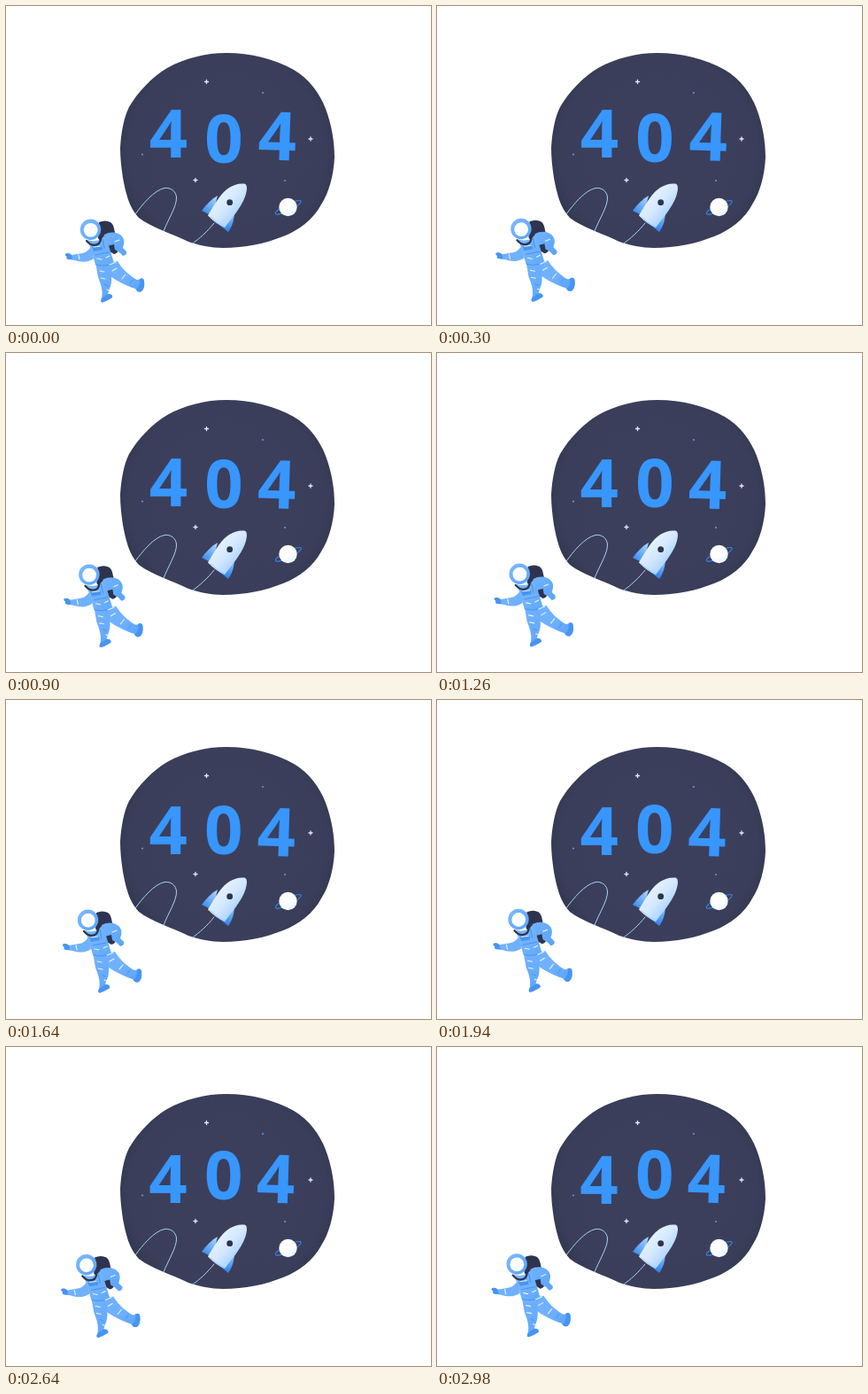
Write an HTML page with a canvas that moves like this. It is 480 px wide and 360 px high and loops after 3000 ms.

```html
<!DOCTYPE html>
<html lang="en">
<head>
<meta charset="utf-8">
<title>404</title>
<style>
html, body { margin: 0; width: 100%; height: 100%; overflow: hidden; background: #fff; }
canvas { display: block; }
</style>
</head>
<body>
<canvas id="stage" width="480" height="360"></canvas>
<script>
const ctx = document.getElementById('stage').getContext('2d');
const LOOP = 3000;
const NAVY = '#3a3e5a', INK = '#2f344e', BLUE = '#3896ff', SUIT = '#70b1ff', SHADE = '#4794f2', PALE = '#d3e8ff';

const space = new Path2D('M249 53C276 53 304 60 325 72C342 82 354 98 361 116C368 135 371 153 371 171C370 191 365 210 356 224C347 241 331 253 313 260C293 268 270 273 245 273C231 273 218 270 206 266C188 257 164 250 150 239C139 228 135 210 132 194C130 181 129 170 129 160C130 143 133 126 139 114C149 97 165 80 182 70C202 59 225 53 249 53Z');

const path = d => new Path2D(d);

function fill(d, color) {
  ctx.fillStyle = color;
  ctx.fill(path(d));
}

function line(d, color, width) {
  ctx.strokeStyle = color;
  ctx.lineWidth = width;
  ctx.lineCap = ctx.lineJoin = 'round';
  ctx.stroke(path(d));
}

function disc(x, y, r, color) {
  ctx.fillStyle = color;
  ctx.beginPath();
  ctx.arc(x, y, r, 0, Math.PI * 2);
  ctx.fill();
}

function linear(x0, y0, x1, y1, ...colors) {
  const g = ctx.createLinearGradient(x0, y0, x1, y1);
  colors.forEach((c, i) => g.addColorStop(i / (colors.length - 1), c));
  return g;
}

function drawSpace() {
  const g = ctx.createRadialGradient(250, 163, 70, 250, 163, 125);
  g.addColorStop(0, '#3b3f5c');
  g.addColorStop(0.75, NAVY);
  g.addColorStop(1, '#343953');
  ctx.fillStyle = g;
  ctx.fill(space);

  for (const [x, y] of [[226.5, 85.5], [344, 150], [214, 196.5]]) {
    line(`M${x - 2} ${y}h4M${x} ${y - 2}v4`, '#dcecff', 1.3);
  }
  for (const [x, y] of [[290, 98], [154, 167.5], [315, 197]]) disc(x, y, 0.9, '#68a9f2');

  line('M146 235C154 224 167 208 179 205.5C186 204.5 192 209 192.5 216C193 226 183 241 178 254', '#a9d2f5', 1);
  line('M210 268.5C218 263 228 254 235 245', '#a9d2f5', 1);
}

function drawPlanet() {
  ctx.strokeStyle = '#3686e6';
  ctx.lineWidth = 1.1;
  ctx.beginPath();
  ctx.ellipse(318.8, 227.3, 16, 3.6, -0.46, 0, Math.PI * 2);
  ctx.stroke();
  disc(318.5, 227, 10.2, linear(314, 219, 324, 237, '#fff', '#fff', '#e8f2ff'));
}

function drawRocket() {
  fill('M239 214C232 218 226 224 221 231L233 237Z', linear(237, 216, 224, 233, '#a5d0ff', '#3e8ff0'));
  fill('M258 231C258 240 256 248 251 255L241 247Z', linear(258, 234, 249, 254, '#8fc3ff', '#2f83ea'));
  fill('M268 200.5C271 200.5 272 202 272 206C271 218 264 229 247 250Q237 246 228 236.5C237 221 244 210 252 205C257 202 263 200 268 200.5Z',
    linear(239, 217, 260, 236, '#e3f1ff', PALE, '#aed5ff'));
  line('M231 238Q239 246 247 249', '#a6cffa', 1);
  disc(252.7, 221.7, 3.4, INK);
}

function drawDigit(char, x, baseline, tilt) {
  ctx.save();
  ctx.translate(x, baseline);
  ctx.rotate(tilt);
  ctx.font = 'bold 76px "Open Sans", "Noto Sans", sans-serif';
  ctx.textAlign = 'center';
  ctx.fillStyle = BLUE;
  ctx.fillText(char, 0, 0);
  ctx.restore();
}

function drawAstronaut() {
  // backpack
  fill('M105 244Q112 241 118 244Q121 246 122 251L127 274Q127 279 122 280L112 274L104 262Z', INK);

  // far leg, then near leg
  fill('M111 291L126 288C130 295 137 302 146 308Q149 310 151 308Q155 306 156 310Q157 317 153 322Q149 324 146 319C136 316 122 309 111 300Z',
    linear(115, 290, 153, 320, SUIT, SUIT, '#5aa3fa'));
  fill('M151 308Q156 306 156 311Q157 319 153 322Q149 324 147 320Q152 316 151 308Z', SHADE);
  fill('M101 289L119 291C118 302 121 311 117 319L115 325Q121 325 120 329Q114 333 109 334.5Q106 334 108 330C110 321 107 314 104 306Z',
    linear(101, 295, 120, 325, SUIT, '#62a9fb'));
  fill('M108 330L115 325Q121 325 120 329Q114 333 109 334.5Q106 334 108 330Z', SHADE);

  // arms
  fill('M111 258C118 254 127 255 131 260C135 265 133 269 132 273L136 277Q137 281 132 282Q128 277 123 275L122 269Q117 270 112 272Z',
    linear(112, 258, 134, 280, SUIT, '#5ba5fa'));
  fill('M97 270C94 275 91 278 86 279L74 281Q71 278 67.5 279.5Q66 281 69 283Q67 285 71 286L78 287C85 289 92 290 99 285Z', SUIT);
  fill('M74 281Q71 278 67.5 279.5Q66 281 69 283Q67 285 71 286L75 286Z', SHADE);

  // torso
  fill('M92 264Q105 268 111 259L115 267L122 290Q112 296 101 292L97 277Z', linear(94, 270, 120, 287, '#78b6ff', '#64abfc'));
  line('M91 265Q98 273 105 268Q108 264 107 258', INK, 2.2);
  line('M109 263L111 273', SHADE, 1.2);
  fill('M97 272L108 270L109 275L99 277Z', SHADE);
  line('M99 272L107 271', '#e6f2ff', 1);
  line('M101 281L116 278M102 292Q112 295 121 290', SHADE, 1);

  // suit bands
  line('M106 299L111 300M117 292L124 289M107 307L112 308M120 299L125 296M131 308L135 303M114 320L117 321M82 281L83 286M123 266L128 264M103 285L108 286M113 284L117 282', '#eaf4ff', 1.1);
  line('M111 314L115 316M140 313L143 309', SHADE, 1);

  // helmet
  disc(95.5, 252.3, 11.7, linear(87, 243, 104, 263, '#7ab7ff', '#5ca5fa'));
  disc(95.7, 252.8, 7.9, linear(90, 247, 101, 260, '#fff', '#fff', '#f0f7ff'));
}

function draw(now) {
  const p = (now % LOOP) / LOOP;
  ctx.fillStyle = '#fff';
  ctx.fillRect(0, 0, 480, 360);
  drawSpace();
  drawPlanet();
  drawRocket();

  const drift = p * (1.15 - 0.15 * p);
  drawDigit('4', 183.5 - 0.6 * p, 170.8 + 6 * drift, 0);
  drawDigit('0', 246 - 0.4 * p, 177 - 6.2 * p, 0);
  drawDigit('4', 305.8 - 2.2 * p, 173.8 + 2.4 * Math.sin(p * 2.3), 0.03);

  ctx.save();
  ctx.translate(-5.4 * p, -7.4 * p);
  drawAstronaut();
  ctx.restore();
}

function tick(now) {
  draw(now);
  requestAnimationFrame(tick);
}
draw(0);
requestAnimationFrame(tick);
</script>
</body>
</html>
```
